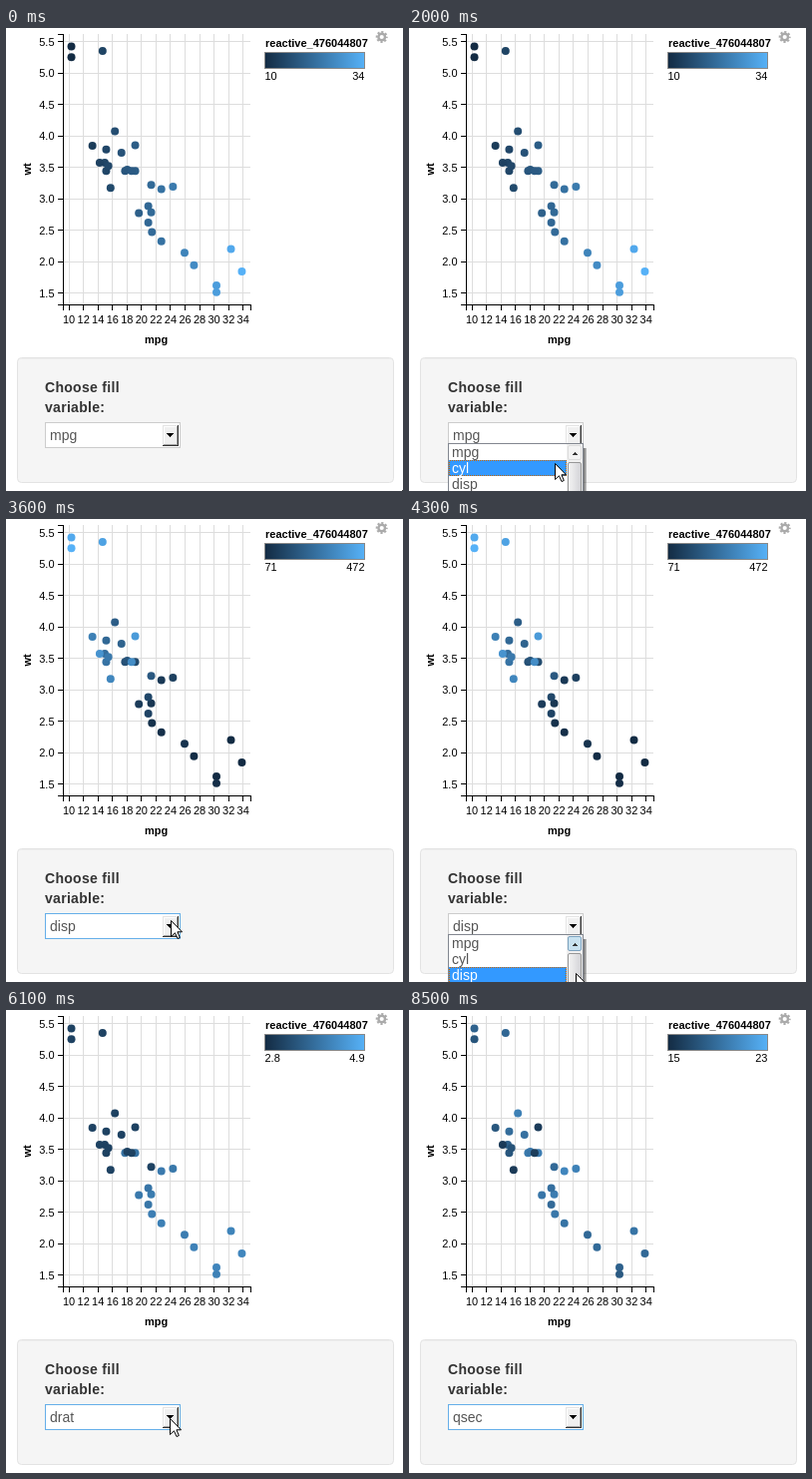
Recreate the animation shown at these times as an HTML page. Size 398 px wide and 464 px high, loop 9 s.

```html
<!DOCTYPE html>
<html lang="en">
<head>
<meta charset="utf-8">
<title>Scatter plot with fill selector</title>
<style>
html, body { margin: 0; width: 100%; height: 100%; overflow: hidden; background: #fff; }
svg { display: block; width: 398px; height: 464px; font-family: "Liberation Sans", Arial, sans-serif; }
.tick { font-size: 11px; }
.bold { font-size: 11px; font-weight: bold; }
.label { font-size: 14px; font-weight: bold; fill: #333; letter-spacing: .3px; }
.option { font-size: 14px; fill: #555; }
.crisp { shape-rendering: crispEdges; }
</style>
</head>
<body>
<svg viewBox="0 0 398 464" xmlns="http://www.w3.org/2000/svg">
  <defs>
    <linearGradient id="ramp"><stop stop-color="#132b43"/><stop offset="1" stop-color="#56b1f7"/></linearGradient>
    <linearGradient id="grip"><stop stop-color="#f5f5f5"/><stop offset="1" stop-color="#d2d2d6"/></linearGradient>
    <linearGradient id="shade"><stop stop-color="#000" stop-opacity=".55"/><stop offset="1" stop-color="#000" stop-opacity=".2"/></linearGradient>
  </defs>

  <g id="grid" class="crisp" stroke="#ddd"></g>
  <g id="axes" class="crisp" stroke="#000" fill="none"></g>
  <g id="ticks" class="tick"></g>
  <text class="bold" x="150.5" y="316" text-anchor="middle">mpg</text>
  <text class="bold" transform="translate(25 141.5) rotate(-90)" text-anchor="middle">wt</text>
  <g id="points"></g>

  <text class="bold" x="260" y="19">reactive_476044807</text>
  <rect x="259.5" y="24.5" width="100" height="16" fill="url(#ramp)" stroke="#888"/>
  <text id="low" class="tick" x="259.5" y="52"></text>
  <text id="high" class="tick" x="359.5" y="52" text-anchor="end"></text>

  <g fill="none" stroke="#aaa">
    <circle cx="376.7" cy="9" r="3.3" stroke-width="2.4"/>
    <circle cx="376.7" cy="9" r="5" stroke-width="2" stroke-dasharray="2.1 1.827" stroke-dashoffset="1.05"/>
  </g>

  <rect x="11.5" y="330.5" width="377" height="125" rx="4" fill="#f5f5f5" stroke="#e3e3e3"/>
  <path d="M14 331.5H386" stroke="#ededed"/>
  <text class="label" x="39" y="365">Choose fill</text>
  <text class="label" x="39" y="385">variable:</text>

  <rect id="box" class="crisp" x="39.5" y="395.5" width="135" height="25" fill="#fff"/>
  <text id="value" class="option" x="44" y="413"></text>
  <g class="crisp" fill="none">
    <rect x="157" y="398" width="16" height="21" fill="#f0f0f0"/>
    <path d="M157.5 418V398.5H172" stroke="#e3e3e3"/>
    <path d="M158.5 417V399.5H171" stroke="#fff"/>
    <path d="M171.5 399V417.5H158" stroke="#a0a0a0"/>
    <path d="M172.5 398V418.5H157" stroke="#333"/>
    <path d="M161 406h7v1h-1v1h-1v1h-1v1h-1v-1h-1v-1h-1v-1h-1z" fill="#000"/>
  </g>

  <g id="list">
    <rect x="175" y="421" width="3" height="43" fill="url(#shade)"/>
    <rect class="crisp" x="39.5" y="416.5" width="135" height="60" fill="#fff" stroke="#828790"/>
    <g id="mark" class="crisp">
      <rect x="40" width="118" height="16" fill="#39f"/>
      <rect x="40.5" y=".5" width="117" height="15" fill="none" stroke="#c60" stroke-dasharray="1 1"/>
    </g>
    <g id="rows"></g>
    <rect x="158" y="417" width="16" height="60" fill="#f0f0f0"/>
    <rect x="159.5" y="418.5" width="13" height="14" rx="1.5" fill="#f3f3f3" stroke="#dcdcdc"/>
    <rect id="hover" x="159.5" y="418.5" width="13" height="14" rx="1.5" fill="#c9e2f0" stroke="#7da2bf"/>
    <path class="crisp" d="M164 428h5v-1h-1v-1h-1v-1h-1v1h-1v1h-1z" fill="#333"/>
    <rect x="159.5" y="435.5" width="13" height="40" rx="1.5" fill="url(#grip)" stroke="#979797"/>
  </g>

  <path id="cursor" d="M.5 .5V16.5L4.5 12.8L7 18.5L9.3 17.5L6.9 11.8H11.5Z" fill="#fff" stroke="#000"/>
</svg>

<script>
const LOOP = 9000, STEP = 100, ROW = 16, LIST_TOP = 417;
const $ = id => document.getElementById(id);
const mix = (a, b, p) => a + (b - a) * p;
const clamp = v => Math.min(1, Math.max(0, v));
const easeOut = p => 1 - (1 - p) ** 2;
const easeInOut = p => p < .5 ? 4 * p ** 3 : 1 - 4 * (1 - p) ** 3;

// Cars as [mpg, wt], from the smallest engine to the largest
const cars = [
  [33.9, 1.84], [30.4, 1.62], [32.4, 2.2], [27.3, 1.94], [30.4, 1.51], [22.8, 2.32], [21.5, 2.47], [26, 2.14],
  [21.4, 2.78], [22.8, 3.15], [19.7, 2.77], [24.4, 3.19], [21, 2.62], [21, 2.88], [19.2, 3.44], [17.8, 3.44],
  [18.1, 3.46], [21.4, 3.22], [16.4, 4.07], [17.3, 3.73], [15.2, 3.78], [15, 3.57], [15.2, 3.44], [15.5, 3.52],
  [13.3, 3.84], [15.8, 3.17], [18.7, 3.44], [14.3, 3.57], [19.2, 3.85], [14.7, 5.35], [10.4, 5.42], [10.4, 5.25]
];

// Legend ends, and the place of a car on the colour ramp; u is its engine rank, 0 to 1
const size = u => u ** 1.8;
const fills = {
  mpg: { ends: ['10', '34'], share: mpg => (mpg - 10.4) / 23.5 },
  disp: { ends: ['71', '472'], share: (mpg, wt, u) => size(u) },
  drat: { ends: ['2.8', '4.9'], share: (mpg, wt, u) => u < .5 ? .68 - .3 * u : .17 },
  qsec: { ends: ['15', '23'], share: (mpg, wt, u) => clamp(wt / 4 - size(u)) }
};
const options = ['mpg', 'cyl', 'disp'];

const picks = [
  { open: 1600, close: 2900, name: 'disp' },
  { open: 3800, close: 5200, name: 'drat' },
  { open: 6300, close: 7700, name: 'qsec' }
];

// Pointer strokes as [time, x, y]; it is off stage between them
const strokes = [
  [[0, 397, 463], [500, 397, 463]],
  [[800, 185, 456], [1200, 144, 416], [1400, 163, 407], [1600, 163, 407], [2700, 134, 456],
    [2900, 134, 456], [3600, 165, 402], [3800, 165, 402], [4600, 167, 464]],
  [[5700, 150, 457], [6200, 165, 407], [6800, 167, 464]],
  [[8400, 128, 457], [8500, 127, 464]]
];

function add(parent, tag, attrs, text) {
  const el = document.createElementNS('http://www.w3.org/2000/svg', tag);
  for (const k in attrs) el.setAttribute(k, attrs[k]);
  if (text !== undefined) el.textContent = text;
  return $(parent).appendChild(el);
}

function along(keys, t) {
  const i = keys.findIndex(k => k[0] > t);
  const a = keys[i - 1], b = keys[i];
  const p = easeOut((t - a[0]) / (b[0] - a[0]));
  return [1, 2].map(k => Math.round(mix(a[k], b[k], p)));
}

const px = v => 57 + (v - 9.225) * 7.273;
const py = v => 277 - (v - 1.3175) * 63;

for (let v = 10; v <= 34; v += 2) {
  const x = Math.round(px(v)) + .5;
  add('grid', 'path', { d: `M${x} 6V277` });
  add('axes', 'path', { d: `M${x} 277V283` });
  add('ticks', 'text', { x: px(v) + .5, y: 296, 'text-anchor': 'middle' }, v);
}
for (let v = 1.5; v <= 5.5; v += .5) {
  const y = Math.floor(py(v)) + .5;
  add('grid', 'path', { d: `M57 ${y}H245` });
  add('axes', 'path', { d: `M52 ${y}H58` });
  add('ticks', 'text', { x: 48.5, y: Math.round(py(v) + 4), 'text-anchor': 'end' }, v.toFixed(1));
}
add('axes', 'path', { d: 'M52 6.5H57.5V277.5H52M57.5 283V277.5H245.5V283' });

const dots = cars.map(([mpg, wt]) => add('points', 'circle', { cx: px(mpg), cy: py(wt), r: 3.99 }));
const rows = options.map((name, i) => add('rows', 'text', { class: 'option', x: 43, y: 430 + ROW * i }, name));

function drawPlot(from, to, age) {
  const p = easeInOut(clamp((age - 75) / 225));
  dots.forEach((dot, i) => {
    const [a, b] = [from, to].map(name => fills[name].share(...cars[i], i / (cars.length - 1)));
    const s = mix(a, b, p);
    dot.setAttribute('fill', `rgb(${mix(19, 86, s)}, ${mix(43, 177, s)}, ${mix(67, 247, s)})`);
  });
  [$('low').textContent, $('high').textContent] = fills[age < 100 ? from : to].ends;
}

function drawList(pick, current, t, x, y) {
  $('list').style.display = pick ? '' : 'none';
  if (!pick) return;
  const age = t - pick.open;
  const over = x < 158 && y >= LIST_TOP;
  const row = over ? Math.floor((y - LIST_TOP) / ROW) : age < 900 ? options.indexOf(current) : -1;
  $('mark').style.display = row < 0 ? 'none' : '';
  $('mark').setAttribute('transform', `translate(0 ${LIST_TOP + ROW * row})`);
  rows.forEach((el, i) => el.style.fill = i === row ? '#fff' : '');

  // Reaching an option below the stage leads over the scroll button
  const passes = !options.includes(pick.name);
  $('hover').style.opacity = passes ? clamp(age / 200) * clamp((1000 - age) / 400) : 0;
}

function draw(t) {
  const pick = picks.find(k => t >= k.open && t < k.close);
  const done = picks.filter(k => t >= k.close);
  const [before, name] = ['mpg', 'mpg', ...done.map(k => k.name)].slice(-2);
  const age = done.length ? t - done[done.length - 1].close : LOOP;

  drawPlot(before, name, age);
  $('value').textContent = name;
  $('box').setAttribute('stroke', pick || !done.length ? '#ccc' : age < 100 ? '#a8bfd5' : '#66afe9');

  const stroke = strokes.find(s => t >= s[0][0] && t < s[s.length - 1][0]);
  const [x, y] = stroke ? along(stroke, t) : [398, 464];
  $('cursor').setAttribute('transform', `translate(${x} ${y})`);
  drawList(pick, name, t, x, y);
}

const start = performance.now();
function tick() {
  const t = (performance.now() - start) % LOOP;
  draw(Math.floor(t / STEP) * STEP);
  requestAnimationFrame(tick);
}
tick();
</script>
</body>
</html>
```
